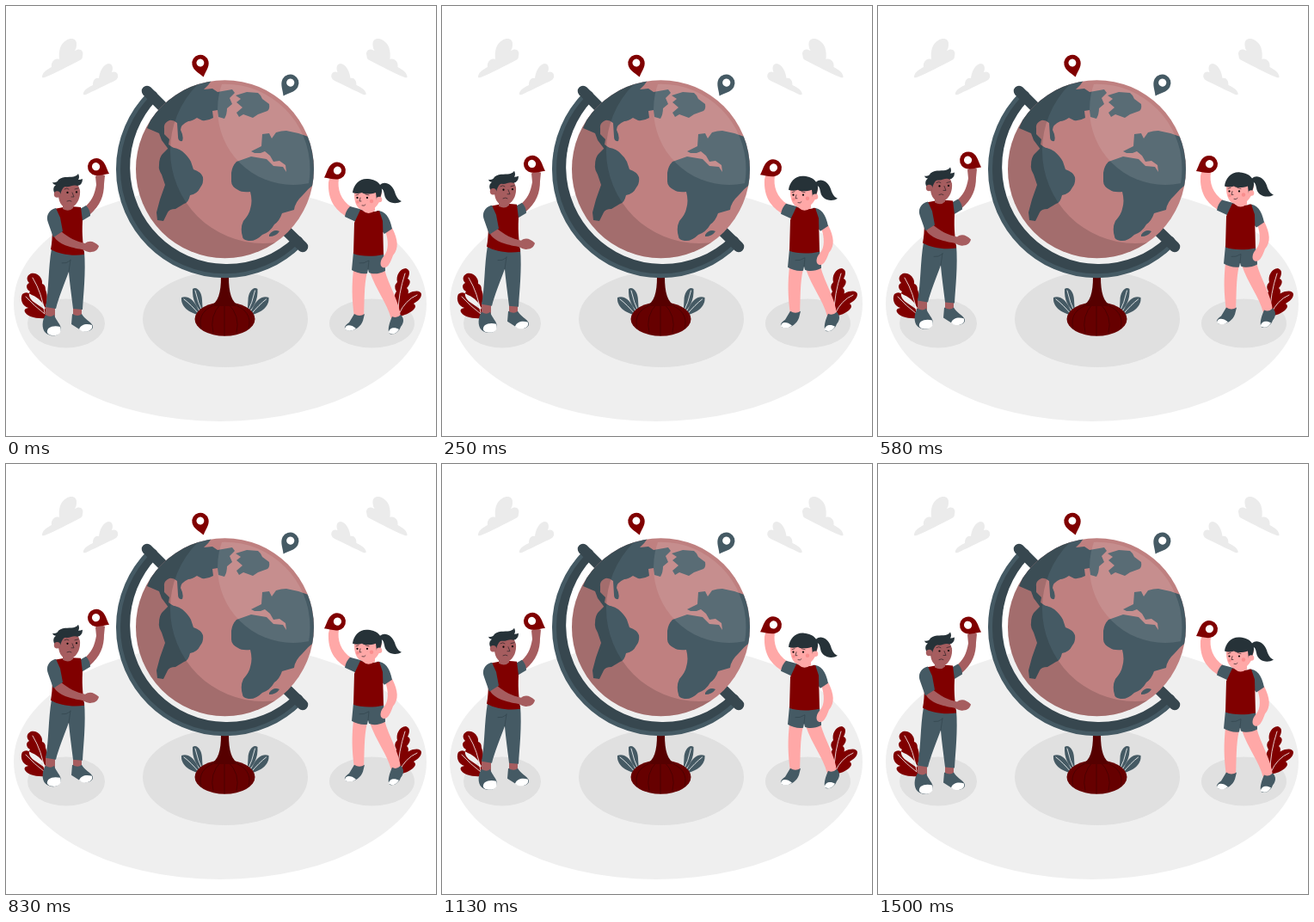
Recreate the animation shown at these times as an HTML page. Size 500 by 500 pixels, loop 1.54 s.

```html
<!DOCTYPE html>
<html lang="en">
<head>
<meta charset="utf-8">
<title>Globe and children</title>
<style>
  html, body { margin: 0; width: 100%; height: 100%; overflow: hidden; background: #fff; }
  svg { display: block; width: 100vw; height: 100vh; }
  .red { fill: #800000; }
  .deep { fill: #660000; }
  .slate { fill: #455a64; }
  .hair { fill: #263238; }
  .tan { fill: #a65d5f; }
  .pink { fill: #ffa8a7; }
  .white { fill: #fff; }
  .line { fill: none; stroke-linecap: round; stroke-linejoin: round; }
  .vein { stroke: #fff; stroke-width: .8; }
  .fold { stroke: #33454e; stroke-width: .7; }
  .face { stroke: #2b2226; stroke-width: .7; }
</style>
</head>
<body>
<svg viewBox="0 0 500 500">
  <defs>
    <clipPath id="ball"><circle cx="254.5" cy="189.7" r="103.5"/></clipPath>
    <clipPath id="inner"><circle cx="254.5" cy="189.7" r="99"/></clipPath>
    <g id="pin">
      <path d="M0 17C-3 12-10 7-10 0A10 10 0 1 1 10 0C10 7 3 12 0 17Z"/>
      <circle class="white" cy="-.5" r="4.6"/>
    </g>
    <g id="clouds" fill="#ebebeb">
      <path d="M42 82C43 76 48 74 53 71C52 65 57 60 62 62C61 52 63 44 70 40C76 36 83 38 82 46Q82 49 80 52C86 48 91 52 89 58Q89 62 86 63C72 70 58 78 45 83Q41 84 42 82Z"/>
      <path d="M90 101C92 96 97 94 101 92C101 86 104 83 108 84C109 76 113 68 119 67C124 67 125 72 123 77C128 75 131 79 130 83C129 86 126 87 122 89C112 94 101 99 93 103Q89 104 90 101Z"/>
    </g>
    <g id="sprout">
      <path class="slate" d="M230 358Q216 347 217 329C222 325 228 333 228 342Q228 350 230 358ZM227 360C212 357 203 349 204 339C211 336 218 342 221 348Q224 353 227 360Z"/>
      <path class="line vein" d="M220 331Q223 345 229 357M207 341Q215 347 225 359"/>
    </g>
  </defs>

  <ellipse cx="249" cy="346" rx="240" ry="137" fill="#efefef"/>
  <g fill="#e0e0e0">
    <ellipse cx="255" cy="364" rx="96" ry="56"/>
    <ellipse cx="70" cy="369" rx="45" ry="28.5"/>
    <ellipse cx="425.5" cy="369" rx="49.5" ry="28.5"/>
  </g>
  <use href="#clouds"/>
  <use href="#clouds" transform="matrix(-1 0 0 1 508.5 0)"/>

  <!-- red plants -->
  <path class="red" d="M45 353C48 345 49 337 46 330Q46 324 42 323C43 316 36 309 29 311C23 314 24 319 27 322C22 324 24 330 28 332C25 335 28 341 32 344ZM47 363C34 364 25 361 22 356Q20 352 26 351C19 349 16 341 19 335Q24 331 30 336C38 339 44 346 46 352Z"/>
  <path class="line vein" d="M31 316Q42 334 45 357M23 338Q33 349 45 358"/>
  <path class="red" d="M453 353C450 342 451 336 454 332Q450 326 455 321C453 314 458 305 465 305C471 307 469 313 467 317C472 319 469 325 466 328C470 331 467 337 464 342ZM453 361C452 350 462 335 473 332Q482 330 483 335C483 341 477 344 474 346Q478 349 474 353C470 357 463 360 456 361Z"/>
  <path class="line vein" d="M464 311Q456 335 456 357M478 336Q464 342 457 358"/>

  <!-- stand -->
  <use href="#sprout"/>
  <use href="#sprout" transform="matrix(-1 0 0 1 509.500 0)"/>
  <ellipse class="deep" cx="254.5" cy="364" rx="35" ry="19.7"/>
  <path class="line" stroke="#4d0000" d="M247 346Q221 354 227 375M250 346Q236 360 241 380M254 346V383M258 346Q273 360 268 380M262 346Q288 354 282 375"/>
  <path fill="#560000" d="M250 315H259C259 333 262 345 272 349H237C247 345 250 333 250 315Z"/>
  <g class="line" stroke="#37474f">
    <path stroke-width="13.500" d="M169.900 105.100A119.700 119.700 0 0 0 339.100 274.300"/>
    <path stroke="#455a64" stroke-width="5" d="M166.800 102A124 124 0 0 0 342.200 277.400"/>
    <path stroke-width="12.5" d="M164 99L182 117M325 260.500L345 280"/>
  </g>

  <!-- globe -->
  <g clip-path="url(#ball)">
    <rect x="150" y="85" width="210" height="210" fill="#bf8080"/>
    <g class="slate">
      <path d="M164 142L180 104L210 84L240 85Q236 92 230 97L240 96L246 100L263 97L266 101L260 107L263 114L257 119Q257 126 254 131L247 129L246 121L240 122L241 130Q234 134 228 133L222 130Q216 134 212 134Q203 138 203 144Q207 152 205 157Q200 158 200 152L199 136Q194 132 190 133Q183 136 184 142V149L190 155L189 161L196 166L204 172L200 176L190 168L181 156L178 148Z"/>
      <path d="M267 104L280 100L293 101Q297 104 298 108L306 114Q307 120 304 122L293 126L287 130L276 126L271 129L268 124L275 118L268 112L273 108Z"/>
      <path d="M190 164Q200 165 205 169Q212 175 215 181L218 190Q227 193 229 199Q230 206 226 211Q222 219 214 220Q212 229 207 230L197 236Q190 236 188 240L183 250L176 249L175 240L179 225L185 208L181 196Q177 190 178 185Q178 176 182 172Z"/>
      <path d="M285 169L297 163L298 149L306 148L309 154L314 147Q320 145 326 145L340 148L360 155V206Q351 212 345 220Q336 228 335 237L321 241Q318 250 312 254Q307 263 298 266Q290 274 282 273Q275 272 275 268Q272 258 276 250Q283 242 284 236Q287 227 284 216Q274 217 270 214Q262 210 262 204V194Q263 186 268 181L285 175L303 178L311 186L322 187L326 193L325 185L318 180L311 181L307 174L301 169L296 171L289 171Z"/>
      <path d="M306 266Q311 259 318 262Q314 268 306 268Z"/>
    </g>
    <path fill-opacity=".15" fill-rule="evenodd" d="M140 80H370V300H140ZM191 168a108 108 0 1 0 216 0a108 108 0 1 0-216 0Z"/>
    <circle cx="334" cy="120" r="88" fill="#fff" fill-opacity=".11" clip-path="url(#inner)"/>
  </g>
  <use href="#pin" class="red" transform="translate(226 66.5) rotate(-13) scale(.97)"/>
  <use href="#pin" class="slate" transform="translate(330.5 89.5) rotate(28)"/>

  <g id="kids">
    <!-- boy -->
    <path class="tan" d="M46 348H57V364H46ZM78 350H88V363H78Z"/>
    <path class="slate" d="M46 359Q52 363 56 359C58 366 64 370 64 376C62 385 52 385 46 380C41 375 42 365 46 359ZM77 358Q84 362 88 358C91 364 99 367 101 372C102 378 92 380 87 377L76 370Z"/>
    <path class="white" d="M48 380C47 374 54 371 63 373C66 380 60 384 54 383Q50 383 48 380ZM85 376C87 370 94 369 100 371C102 377 94 380 88 378Z"/>
    <path class="slate" d="M53 282L91 285C93 310 90 335 89 353L78 352C76 335 74 322 73 309C67 325 61 340 58 352L46 350C50 330 49 305 53 282Z"/>
    <path class="line fold" d="M73 309L75 295M75 296Q70 300 65 299"/>
    <path class="tan" d="M91 234C99 228 103 220 105 208L104 198Q108 194 115 197L114 207C114 220 110 232 97 243Z"/>
    <path class="slate" d="M86 236L93 232Q98 237 98 244L88 250Z"/>
    <path class="red" d="M56 236Q72 232 87 234L89 250C88 268 90 278 91 289C78 291 62 289 52 283C55 270 53 250 56 236Z"/>
    <path class="tan" d="M66 226H78V235Q73 240 66 236Z"/>
    <path class="tan" d="M56 268L64 262C72 269 82 274 92 276C97 272 103 274 108 279C107 283 104 286 99 286C95 287 92 284 88 283C76 281 60 277 56 268Z"/>
    <path class="slate" d="M58 235C49 237 46 245 49 252L55 269L66 262L63 246Z"/>
    <path class="tan" d="M61 211C60 224 62 232 70 235C80 236 87 226 86 214L83 206H64Z"/>
    <path class="hair" d="M60 222C54 216 54 211 58 208Q55 208 54 205Q59 206 61 202C67 197 76 200 80 198Q83 197 84 195Q86 199 84 202Q87 202 89 201Q89 208 83 209C78 207 75 211 69 210C65 211 64 217 62 222Z"/>
    <circle class="tan" cx="59.5" cy="219" r="3.7"/>
    <path class="line face" d="M68 213Q71 211 73 213M80 213L84 212M77 217L79 222L76 222M71 227Q74 225.500 76 227"/>
    <circle cx="71.5" cy="217" r="1.1"/><circle cx="82" cy="216.500" r="1.1"/>
    <use href="#pin" class="red" transform="translate(105 187) rotate(-62)"/>

    <!-- girl -->
    <path class="hair" d="M435 208C440 203 449 207 452 216C454 223 457 226 460 227C452 232 441 228 440 219C439 214 438 212 435 212Z"/>
    <path class="pink" d="M404 306L420 309C416 325 417 345 416 362H405C402 340 402 325 404 306ZM423 309L440 306C445 325 458 345 459 362L448 364C443 345 430 330 423 309Z"/>
    <path class="slate" d="M405 358Q411 362 417 358L415 366C412 374 404 379 396 377C392 375 394 371 399 368ZM449 361Q454 364 459 359C463 363 463 368 459 373C457 379 451 383 446 381C443 377 446 368 449 361Z"/>
    <path class="white" d="M394 376C394 371 400 369 407 375Q400 380 394 376ZM445 380C445 374 452 373 457 376Q452 384 445 380Z"/>
    <path class="slate" d="M404 286L439 288Q441 300 441 308C434 312 426 312 422 310L421 306L420 311C414 312 407 310 402 307Z"/>
    <path class="line fold" d="M421 306L422 296Q416 300 411 299"/>
    <path class="pink" d="M376 201Q382 196 387 201C385 212 389 226 402 234L396 245C383 237 374 226 375 205ZM441 262L449 258C456 272 457 282 450 290C447 298 444 306 438 304C434 302 435 295 440 290C445 284 445 272 441 262Z"/>
    <path class="slate" d="M415 237L400 233Q395 238 394 245L407 251ZM431 238C441 238 446 245 449 259L440 265L434 258Z"/>
    <path class="red" d="M412 237Q422 241 434 238L438 250L439 289C425 292 412 291 404 288L405 252Z"/>
    <path class="pink" d="M415 232H429V238Q421 244 415 238Z"/>
    <path class="pink" d="M405 214C404 232 410 238 419 238C430 238 436 228 437 216L420 207Z"/>
    <path class="hair" d="M403 217C404 208 411 200 421 201C433 202 440 210 436 220Q435 225 431 226L430 217C424 219 416 219 414 217Q408 219 403 217Z"/>
    <circle class="pink" cx="434" cy="225" r="3.3"/>
    <g fill="#f98d8d"><circle cx="409" cy="228" r="1.8"/><circle cx="425" cy="227" r="2.2"/></g>
    <path class="line face" d="M407 220L410 219M418 219L422 220M412 223L411 227H413M414 232Q417 233 418 231"/>
    <circle cx="408.500" cy="223" r="1.1"/><circle cx="420" cy="223" r="1.1"/>
    <use href="#pin" class="red" transform="translate(385 191.500) rotate(62)"/>
  </g>
</svg>
<script>
  const PERIOD = 1540, LEAD = 40, RISE = 10;
  const kids = document.getElementById('kids');

  // Steady rise and fall, already slightly under way when the loop starts.
  function draw(now) {
    const phase = (now + LEAD) % PERIOD / PERIOD;
    const lift = RISE * (1 - Math.abs(1 - 2 * phase));
    kids.setAttribute('transform', `translate(0 ${(0.5 - lift).toFixed(3)})`);
  }

  const start = performance.now();
  function tick() {
    draw(performance.now() - start);
    requestAnimationFrame(tick);
  }
  tick();
</script>
</body>
</html>
```
